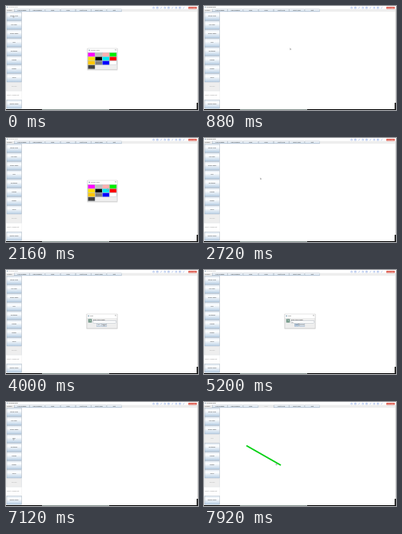
An HTML page with a canvas that plays this animation: 240x130 px, repeating every 8000 ms.

```html
<!DOCTYPE html>
<html lang="en">
<head>
<meta charset="utf-8">
<title>Drawing tool</title>
<style>
html, body { margin: 0; width: 100%; height: 100%; overflow: hidden; background: #fff; }
canvas { display: block; width: 240px; height: 130px; }
</style>
</head>
<body>
<canvas id="stage" width="240" height="130"></canvas>
<script>
const ctx = document.getElementById('stage').getContext('2d');
const LOOP = 8000, STEP = 80;
const FONT = '"Liberation Sans", Arial, sans-serif';

const tabs = ['Load Drawing', 'Save Drawing', 'Clear', 'Undo', 'Print to File', 'Select Color', 'Exit'];
const tools = ['Stroke Color', 'Fill Color', 'Stroke Width', 'Line', 'Rectangle', 'Square', 'Ellipse', 'Circle', 'Polygon', '', 'Delete Shape'];
const swatches = ['magenta', 'silver', '#ffafaf', '#00f000', '#ffe000', 'black', '#00e8f0', 'red',
  '#ffc800', 'gray', 'blue', 'white', '#404040'];

// Places the pointer visits
const tool = i => ({ x: 9, y: 12.5 + 11 * i });
const swatch = i => ({ x: 105 + 9 * (i % 4), y: 60 + 5.2 * Math.floor(i / 4) });
const ok = { x: 118, y: 67 }, cancel = { x: 122, y: 68 };
const lineStart = { x: 53, y: 54.5 }, lineEnd = { x: 96, y: 79 };

// Each move: start, end, destination; the pointer rests in between
const moves = [
  [80, 240, swatch(2)], [400, 560, swatch(3)], [720, 1280, tool(1)],
  [1600, 2240, swatch(7)], [2400, 3040, tool(2)], [3280, 3920, cancel],
  [4000, 4240, ok], [5200, 5600, tool(3)], [5680, 6160, ok],
  [6480, 6880, tool(3)], [7200, 7520, lineStart], [7600, 7760, lineEnd],
  [7840, 7920, { x: 90, y: 77 }]
];

const within = (t, a, b) => t >= a && t < b;
const mix = (a, b, p) => a + (b - a) * p;

function rect(x, y, w, h, fill) {
  ctx.fillStyle = fill;
  ctx.fillRect(x, y, w, h);
}

function frame(x, y, w, h, color, width = 0.3) {
  ctx.strokeStyle = color;
  ctx.lineWidth = width;
  ctx.strokeRect(x, y, w, h);
}

function label(s, x, y, color = '#444', align = 'left', size = 1.8) {
  ctx.font = `${size}px ${FONT}`;
  ctx.textAlign = align;
  ctx.textBaseline = 'middle';
  ctx.fillStyle = color;
  ctx.fillText(s, x, y);
}

function button(s, x, y, w, h, state = '') {
  let fill = '#eee';
  if (state === 'down') fill = '#b8cfe5';
  else if (state !== 'off') {
    fill = ctx.createLinearGradient(0, y, 0, y + h);
    fill.addColorStop(0, '#dde8f3');
    fill.addColorStop(0.3, '#fff');
    fill.addColorStop(1, '#b8cfe5');
  }
  rect(x, y, w, h, fill);
  frame(x + 0.2, y + 0.2, w - 0.4, h - 0.4, state === 'off' ? '#d2d8de' : '#8a99a8');
  label(s, x + w / 2, y + h / 2, state === 'off' ? '#aaa' : '#333', 'center');
}

function toolbar() {
  ctx.strokeStyle = '#6f92dc';
  ctx.lineWidth = 0.5;
  for (let i = 0; i < 9; i++) {
    const x = 184.5 + 4.7 * i;
    ctx.beginPath();
    if (i % 3 === 0) ctx.arc(x, 2.3, 0.9, 0, 7);
    else if (i % 3 === 1) ctx.rect(x - 0.9, 1.4, 1.8, 1.8);
    else {
      ctx.moveTo(x - 1, 3.2);
      ctx.lineTo(x + 1, 1.4);
    }
    ctx.stroke();
  }
  rect(228, 1, 10.5, 2.8, '#dc5548');
  label('Recording', 233.2, 2.4, '#fff', 'center');
}

function mainWindow(t, modal) {
  rect(0, 0, 240, 130, '#fff');
  rect(1, 0.8, 1.3, 1.3, '#8da3b7');
  label('Drawing Editor', 3.3, 1.6, modal ? '#999' : '#222');
  toolbar();

  rect(0, 3.7, 240, 3.5, '#eee');
  label('Drawing', 1, 5.5);
  tabs.forEach((s, i) => button(s, 10.3 + i * 19.25, 3.8, 19, 3.3, i === 3 && t >= 7680 ? 'off' : ''));

  rect(0, 7.2, 20, 122, '#eee');
  const pressed = within(t, 1280, 1600) ? 1 : within(t, 3040, 3280) ? 2 : within(t, 5600, 5680) ? 3 : -1;
  tools.forEach((s, i) => {
    const y = 7.6 + i * 11;
    if (i === 9) {
      rect(0, y, 19.5, 10.8, '#fff');
      label('Select a shape first', 1, y + 5.4, '#888');
      return;
    }
    const off = i === 8 || (i === 3 && t >= 7280);
    button(s, 0.8, y, 18.7, 10.6, off ? 'off' : i === pressed ? 'down' : '');
  });

  rect(239, 4, 1, 126, '#ddd');
  rect(0, 129, 240, 1, '#000');
  rect(45, 129, 84, 1, '#8a9692');
  rect(238.4, 121, 1.6, 9, '#111');
}

function dialog(x, y, w, h, title) {
  rect(x - 0.5, y, w + 1, h + 0.8, '#e2e2e2');
  rect(x, y, w, h, '#eee');
  rect(x, y, w, 5, '#fff');
  frame(x, y, w, h, '#aaa');
  rect(x + 1.5, y + 1.7, 1.5, 1.5, '#82a0b5');
  label(title, x + 4, y + 2.6);
  label('×', x + w - 2.2, y + 2.5, '#555', 'center', 3);
}

function palette() {
  dialog(102, 53, 37, 26.7, 'Choose Color');
  swatches.forEach((color, i) => {
    const { x, y } = swatch(i);
    rect(x - 2.5, y - 1.7, 8.6, 4.8, color);
    frame(x - 2.5, y - 1.7, 8.6, 4.8, '#a5b0ba');
  });
}

function widthPrompt(t) {
  dialog(101, 55, 38, 18, 'Input');
  rect(102.8, 61.2, 4.5, 4.5, '#6f9585');
  label('?', 105, 63.6, '#fff', 'center', 3.6);
  label('Enter stroke width:', 109, 62.2, '#222');
  rect(109, 63.7, 28.5, 2.7, '#fff');
  frame(109, 63.7, 28.5, 2.7, '#8a99a8');
  if (t >= 4400) label(t >= 4880 ? '10' : '1', 109.6, 65.1, '#222');
  button('OK', 113, 67.2, 5.8, 3.5, t >= 5120 ? 'down' : '');
  button('Cancel', 119.3, 67.2, 6.8, 3.5);
}

function hint(t) {
  dialog(103, 55.5, 34, 17, 'Hint');
  ctx.fillStyle = '#94a5b8';
  ctx.beginPath();
  ctx.arc(107, 63.4, 1.8, 0, 7);
  ctx.fill();
  label('i', 107, 63.5, '#fff', 'center', 3);
  label('Click start and end', 111, 63.5, '#222');
  button('OK', 116.5, 66.5, 6, 3.6, t >= 6400 ? 'down' : '');
}

function pointerAt(t) {
  let pos = tool(0);
  for (const [start, end, to] of moves) {
    if (t <= start) break;
    const p = Math.min(1, (t - start) / (end - start));
    const e = p * p * (3 - 2 * p);
    pos = { x: mix(pos.x, to.x, e), y: mix(pos.y, to.y, e) };
  }
  return pos;
}

function pointer(t) {
  const { x, y } = pointerAt(t);
  ctx.beginPath();
  ctx.moveTo(x, y);
  ctx.lineTo(x, y + 2);
  ctx.lineTo(x + 1.4, y + 1.4);
  ctx.closePath();
  ctx.fillStyle = '#fff';
  ctx.fill();
  ctx.strokeStyle = '#444';
  ctx.lineWidth = 0.3;
  ctx.stroke();
}

function draw(t) {
  const colors = t < 640 || within(t, 1600, 2480);
  const prompt = within(t, 3280, 5280);
  const message = within(t, 5680, 6480);
  mainWindow(t, colors || prompt || message);
  if (t >= 7840) {
    ctx.strokeStyle = '#00d010';
    ctx.lineWidth = 1.8;
    ctx.beginPath();
    ctx.moveTo(lineStart.x, lineStart.y);
    ctx.lineTo(lineEnd.x, lineEnd.y);
    ctx.stroke();
  }
  if (colors) palette();
  if (prompt) widthPrompt(t);
  if (message) hint(t);
  pointer(t);
}

function tick() {
  draw(Math.floor(performance.now() % LOOP / STEP) * STEP);
  requestAnimationFrame(tick);
}
tick();
</script>
</body>
</html>
```
